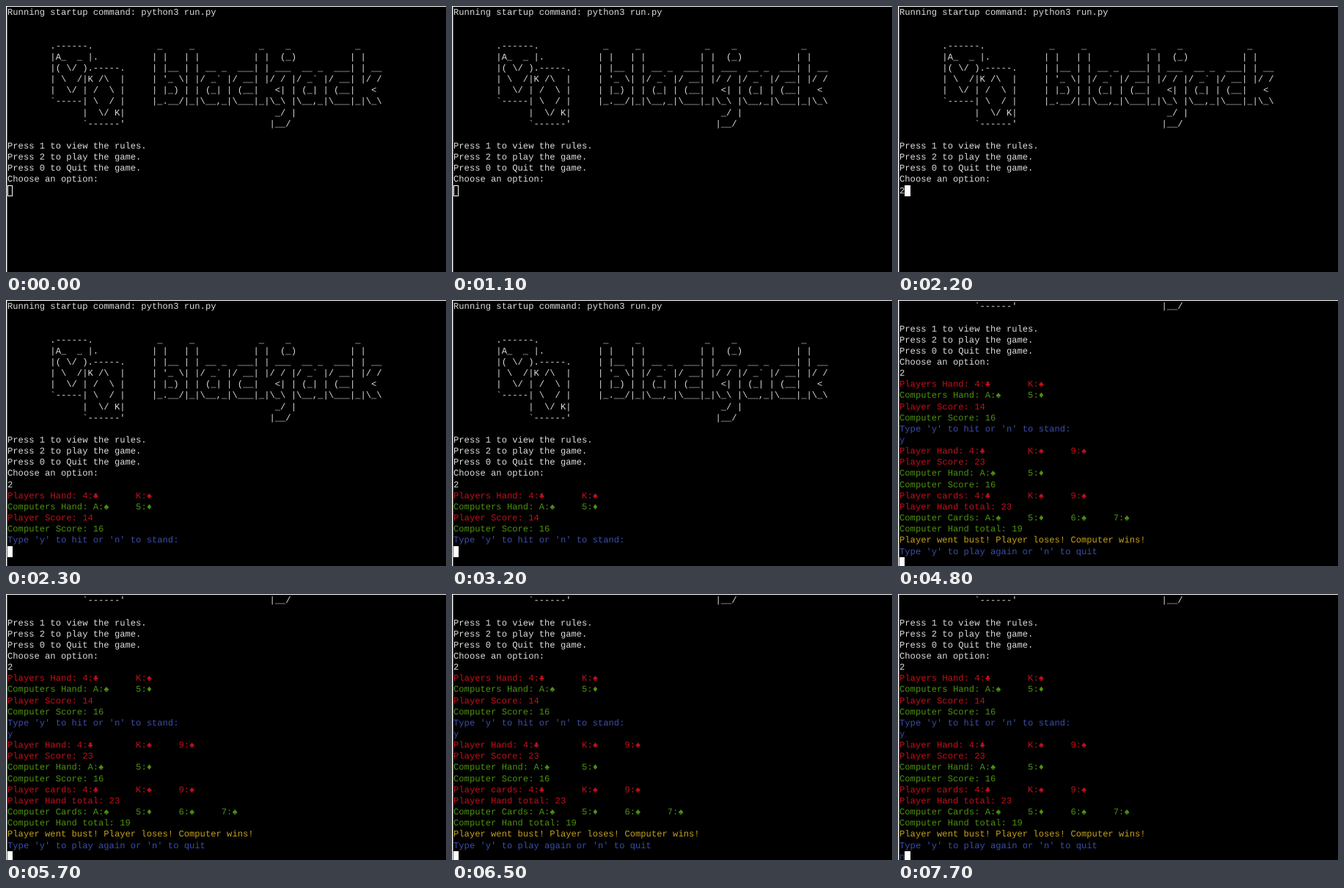
Recreate the animation shown at these times as an HTML page. Size 600x362 px, loop 8 s.

```html
<!DOCTYPE html>
<html lang="en">
<head>
<meta charset="utf-8">
<title>Blackjack terminal</title>
<style>
  html, body { margin: 0; width: 100%; height: 100%; overflow: hidden; background: #000; }
  #screen {
    position: absolute; inset: 0; overflow: hidden;
    /* Lines are 2px taller than their rows, which seats the text 1px lower. */
    font: 12.17px/17.15px "Liberation Mono", monospace;
    text-rendering: geometricPrecision;
  }
  #screen div { position: absolute; height: 15.15px; white-space: pre; tab-size: 8; }
  #edge {
    position: absolute; inset: 0;
    border: solid #fff; border-width: 1px 0 0 1px;
    box-shadow: inset 1px 0 #666;
  }
  .w { color: #dcdcdc; }
  .r { color: #c0101c; }
  .g { color: #4e9010; }
  .b { color: #3c4ca8; }
  .y { color: #c4a018; }
  #screen .cursor { width: 7.3px; box-sizing: border-box; border: 1px solid #fff; }
  #screen .focused { background: #fff; }
</style>
</head>
<body>
<div id="screen"></div>
<div id="edge"></div>

<!-- The first letter of each row selects its colour. -->
<script type="text/plain" id="transcript">
wRunning startup command: python3 run.py
w
w
w        .------.            _     _            _    _            _
w        |A_  _ |.          | |   | |          | |  (_)          | |
w        |( \/ ).-----.     | |__ | | __ _  ___| | ___  __ _  ___| | __
w        | \  /|K /\  |     | '_ \| |/ _` |/ __| |/ / |/ _` |/ __| |/ /
w        |  \/ | /  \ |     | |_) | | (_| | (__|   <| | (_| | (__|   <
w        `-----| \  / |     |_.__/|_|\__,_|\___|_|\_\ |\__,_|\___|_|\_\
w              |  \/ K|                            _/ |
w              `------'                           |__/
w
wPress 1 to view the rules.
wPress 2 to play the game.
wPress 0 to Quit the game.
wChoose an option:
w2
rPlayers Hand: 4:♣	K:♠
gComputers Hand: A:♠	5:♦
rPlayer Score: 14
gComputer Score: 16
bType 'y' to hit or 'n' to stand:
by
rPlayer Hand: 4:♣	K:♠	9:♠
rPlayer Score: 23
gComputer Hand: A:♠	5:♦
gComputer Score: 16
rPlayer cards: 4:♣	K:♠	9:♠
rPlayer Hand total: 23
gComputer Cards: A:♠	5:♦	6:♠	7:♠
gComputer Hand total: 19
yPlayer went bust! Player loses! Computer wins!
bType 'y' to play again or 'n' to quit
bn
</script>

<script>
const LOOP = 8000, ROWS = 24, ROW_HEIGHT = 15.15, CHAR_WIDTH = 7.3, LEFT = 2, TOP = 1.2;
const screen = document.getElementById("screen");
const transcript = document.getElementById("transcript").textContent.trim().split("\n");

// Each state shows complete rows plus the characters typed on the next row.
const states = [
  { at: 0, rows: 16, typed: 0, focused: false },
  { at: 1200, rows: 16, typed: 0, focused: true },
  { at: 1500, rows: 16, typed: 1, focused: true },
  { at: 2300, rows: 22, typed: 0, focused: true },
  { at: 4300, rows: 22, typed: 1, focused: true },
  { at: 4800, rows: 33, typed: 0, focused: true },
  { at: 7200, rows: 33, typed: 1, focused: true },
];

function addBox(className, text, row, column = 0) {
  const box = document.createElement("div");
  box.className = className;
  box.textContent = text;
  box.style.top = TOP + row * ROW_HEIGHT + "px";
  box.style.left = LEFT + column * CHAR_WIDTH + "px";
  screen.append(box);
}

function render({ rows, typed, focused }) {
  const scroll = Math.max(0, rows + 1 - ROWS);
  screen.replaceChildren();
  transcript.slice(scroll, rows + typed).forEach((line, row) => addBox(line[0], line.slice(1), row));
  addBox(focused ? "cursor focused" : "cursor", "", rows - scroll, typed);
}

let shown;
function tick() {
  const time = performance.now() % LOOP;
  const state = states.findLast(({ at }) => at <= time);
  if (state !== shown) render(shown = state);
  requestAnimationFrame(tick);
}
tick();
</script>
</body>
</html>
```
